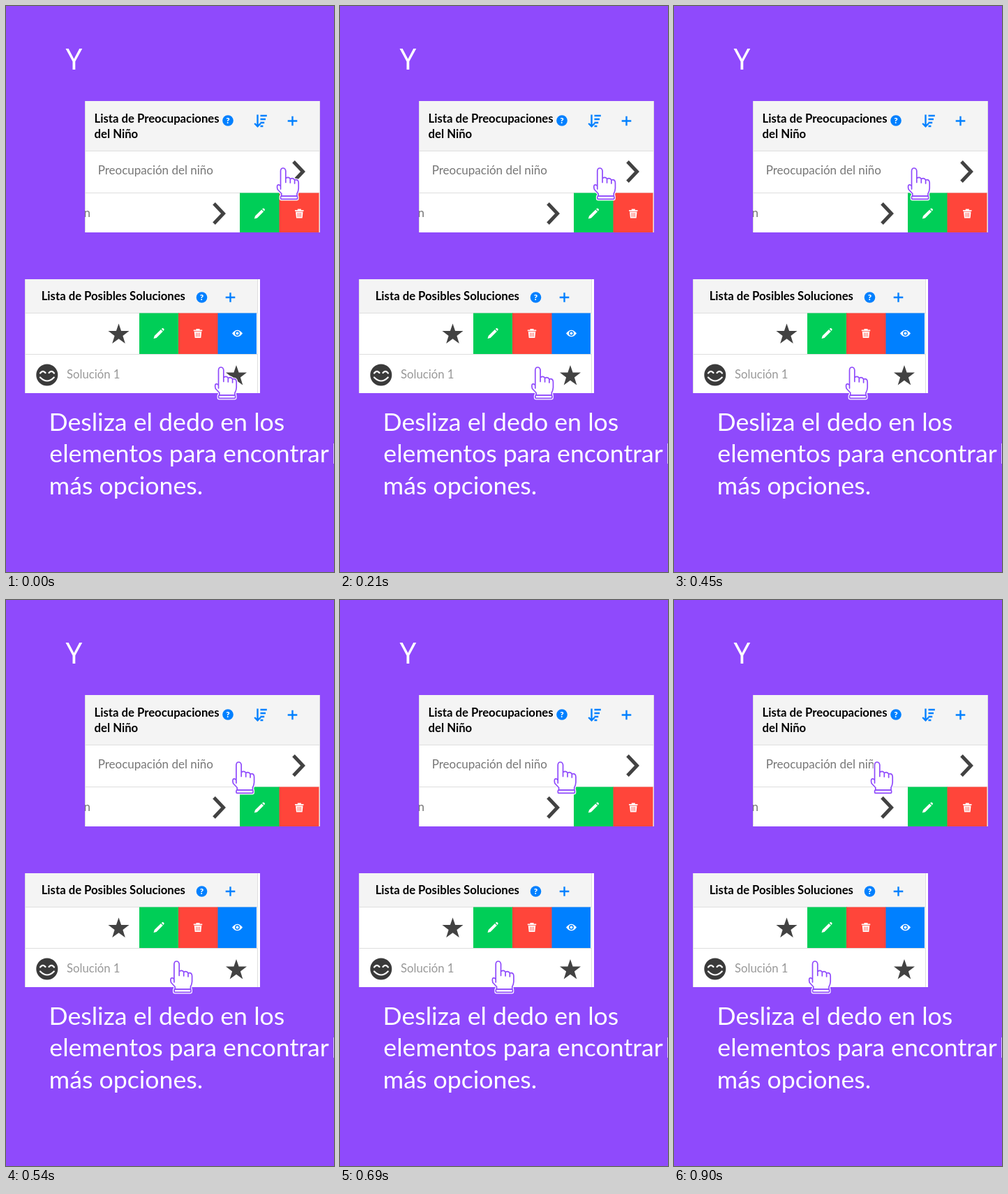
Recreate the animation shown at these times as an HTML page. Size 470x810 px, loop 930 ms.

```html
<!DOCTYPE html>
<html lang="es">
<head>
<meta charset="utf-8">
<style>
  html, body { margin: 0; width: 100%; height: 100%; overflow: hidden; background: #8f4afc; }
  svg { display: block; width: 470px; height: 810px; font-family: Lato, "Open Sans", sans-serif; }
  .title { font-size: 16.7px; font-weight: 700; }
  .item { font-size: 17px; fill: #777; }
  .big { font-size: 35.7px; fill: #fff; }
  .blue { fill: #0080ff; }
  .green { fill: #00ce57; }
  .red { fill: #ff453a; }
  .head { fill: #f4f4f4; }
  .rule { stroke: #dedede; }
  .line { fill: none; stroke: #0080ff; stroke-width: 2.4; }
  .dark { fill: #424242; }
</style>
</head>
<body>
<svg viewBox="0 0 470 810">
  <defs>
    <g id="help">
      <circle class="blue" r="7.8"/>
      <text y="4.1" text-anchor="middle" font-size="11.5" font-weight="900" fill="#fff">?</text>
    </g>
    <path id="plus" class="line" d="M-6.8 0H6.8M0-6.8V6.8"/>
    <path id="chevron" d="M-7.5-14.2L6 0L-7.5 14.2" fill="none" stroke="#424242" stroke-width="5"/>
    <path id="star" class="dark" d="M0-15L3.6-4.4H15L5.9 2.4L9.3 13.5L0 6.8L-9.3 13.5L-5.9 2.4L-15-4.4H-3.6Z"/>
    <path id="pencil" fill="#fff" d="M-7.5 7.5L-6.3 3.4L2.9-5.6L5.8-2.7L-3.4 6.4ZM3.8-6.4L4.8-7.3Q5.6-7.9 6.4-7.2L7.4-6.2Q8-5.4 7.3-4.5L6.6-3.6Z"/>
    <g id="trash">
      <path fill="#fff" d="M-6.2-5H-2.5V-6.6H2.5V-5H6.2V-3.3H-6.2ZM-5.2-2.4H5.2L4.3 6.6H-4.3Z"/>
      <path stroke="#ff453a" d="M-2.2-1V5M0-1V5M2.2-1V5" stroke-width=".8"/>
    </g>
    <g id="hand" stroke-linejoin="round" stroke-linecap="round">
      <g id="outline" fill="#fff" stroke="#fff" stroke-width="4">
        <path d="M5.5 27V5Q5.8 1 9 1T12.8 5V15.5Q17 12.8 19.3 16.4Q23.6 14.2 25.6 18Q31 16.6 31.2 22V30Q31 34 29 37.5V41H6.8V37.5L1.2 31.5Q0 28 1 25.5Q3.5 23.8 5.5 27Z"/>
        <rect x="5.6" y="41" width="24" height="4.4" rx="1.2"/>
      </g>
      <g fill="none" stroke="#8f4afc" stroke-width="1.7">
        <path d="M5.5 31V5Q5.8 1 9 1T12.8 5V21.5M12.8 15.5Q17 12.8 19.3 16.4V22M19.3 16.4Q23.6 14.2 25.6 18V23M25.6 18Q31 16.6 31.2 22V30Q31 34 29 37.5V41H6.8V37.5L1.2 31.5Q0 28 1 25.5Q3.5 23.8 5.5 27"/>
        <rect x="5.6" y="41" width="24" height="4.4" rx="1.2"/>
      </g>
    </g>
    <clipPath id="listClip"><rect x="113" y="136" width="337" height="188"/></clipPath>
  </defs>

  <text x="97.5" y="91" text-anchor="middle" font-size="42" fill="#fff" font-family="Noto Sans, sans-serif">Y</text>

  <g clip-path="url(#listClip)">
    <rect x="113" y="136" width="337" height="188" fill="#fff"/>
    <rect class="head" x="113" y="136" width="337" height="71"/>
    <path class="rule" d="M113 207.5H450M113 267.5H450M113.5 136V324M449.5 136V324"/>
    <text class="title" x="126.6" y="167">Lista de Preocupaciones</text>
    <text class="title" x="126.6" y="189">del Niño</text>
    <use href="#help" x="318" y="164"/>
    <path class="line" d="M360.5 155.5V172M356.2 168L360.5 172.3L364.8 168M364.5 157H373.8M364.5 162H372M364.5 167H370.2M364.5 172H368.4"/>
    <use href="#plus" x="410.5" y="164.5"/>
    <text class="item" x="131.7" y="241">Preocupación del niño</text>
    <text class="item" x="111.6" y="302">n</text>
    <use href="#chevron" x="419.5" y="237"/>
    <use href="#chevron" x="305.5" y="297"/>
    <rect class="green" x="335" y="267.5" width="57" height="57"/>
    <rect class="red" x="391.5" y="267.5" width="57" height="57"/>
    <use href="#pencil" x="363.3" y="297"/>
    <use href="#trash" x="420.3" y="297"/>
  </g>

  <g>
    <rect x="27" y="391" width="337" height="163" fill="#fff"/>
    <rect class="head" x="27" y="391" width="333" height="48"/>
    <path class="rule" d="M27 439.5H360M27 498.5H360M27.5 391V554M360.5 391V554"/>
    <text class="title" x="50.7" y="421">Lista de Posibles Soluciones</text>
    <use href="#help" x="280.5" y="417"/>
    <use href="#plus" x="321.5" y="417"/>
    <use href="#star" x="161.5" y="469.5"/>
    <rect class="green" x="191" y="439.5" width="57" height="58.5"/>
    <rect class="red" x="247" y="439.5" width="57" height="58.5"/>
    <rect class="blue" x="303.5" y="439.5" width="55.5" height="58.5"/>
    <use href="#pencil" x="219" y="468.5"/>
    <use href="#trash" x="275" y="468.5"/>
    <path fill="#fff" d="M324 468.5Q331.5 458.8 339 468.5Q331.5 478.2 324 468.5Z"/>
    <circle class="blue" cx="331.5" cy="468.5" r="3.4"/>
    <circle fill="#fff" cx="331.5" cy="468.5" r="1.9"/>
    <circle cx="58.8" cy="528" r="15.5" fill="#3a3a3a"/>
    <path d="M49 525.5Q53 520.5 56.5 525M61.5 525Q65 520.5 69 525.5M49 531.5Q59 541.5 68.8 531.5" fill="none" stroke="#fff" stroke-width="2.2" stroke-linecap="round"/>
    <text class="item" x="87" y="533" style="font-size:16.7px;fill:#999">Solución 1</text>
    <use href="#star" x="330" y="529"/>
  </g>

  <g class="big">
    <text x="61.5" y="607.5">Desliza el dedo en los</text>
    <text x="62.3" y="653">elementos para encontrar</text>
    <text x="61.8" y="698.5">más opciones.</text>
  </g>
  <path d="M469.5 626V655" stroke="#d5bcff"/>

  <g id="hands">
    <use href="#hand" x="388" y="231"/>
    <use href="#hand" x="299" y="516"/>
  </g>
</svg>
<script>
  const hands = document.getElementById("hands");
  const STEP = 30, STEPS = 31, TRAVEL = -106;

  function draw() {
    const step = Math.floor(performance.now() / STEP) % STEPS;
    hands.setAttribute("transform", `translate(${TRAVEL * step / (STEPS - 1)} 0)`);
    requestAnimationFrame(draw);
  }
  draw();
</script>
</body>
</html>
```
